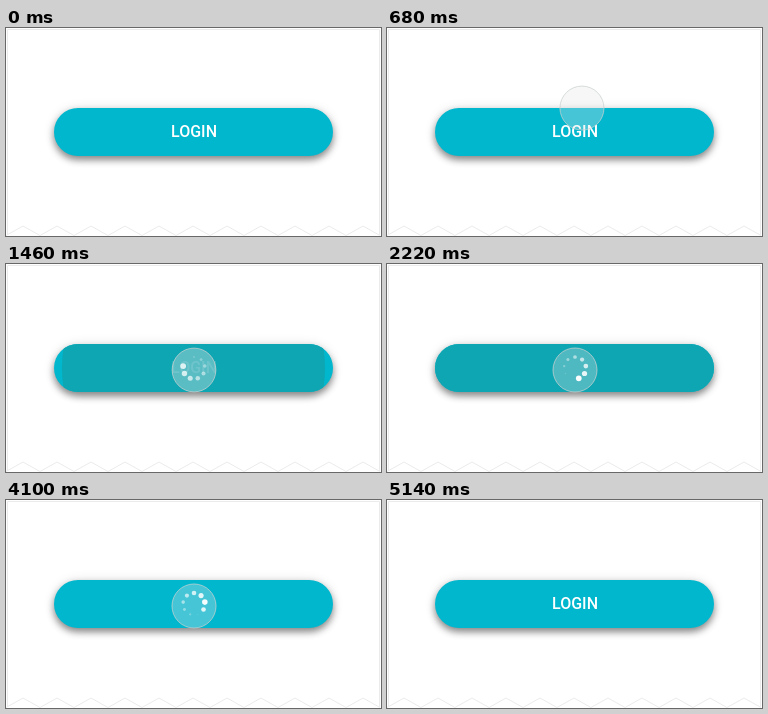
An HTML page that plays this animation: 375 px wide and 208 px high, repeating every 5820 ms.

```html
<!DOCTYPE html>
<html lang="en">
<head>
<meta charset="utf-8">
<title>Login button</title>
<style>
  html, body { margin: 0; width: 100%; height: 100%; overflow: hidden; background: #fff; }
  #button {
    position: absolute; left: 48px; top: 80px; width: 279px; height: 48px;
    border-radius: 24px; background: #00b7ce;
  }
  svg { position: absolute; left: 0; top: 0; }
  text { font: 500 16px Roboto, sans-serif; fill: #fff; text-anchor: middle; }
</style>
</head>
<body>
<div id="button"></div>
<svg width="375" height="208" viewBox="0 0 375 208">
  <clipPath id="pill"><rect x="48" y="80" width="279" height="48" rx="24"/></clipPath>
  <path id="paper" fill="none" stroke="#ebebeb"/>
  <circle id="ripple" cx="187.5" cy="104" fill="#0ea6b2" clip-path="url(#pill)"/>
  <text id="label" x="188" y="109">LOGIN</text>
  <circle id="cursor" stroke="#cbd0d0" stroke-opacity=".75"/>
  <g id="spinner" fill="#fff"></g>
</svg>
<script>
const LOOP = 5820, SPIN = 1045, DOTS = 9;
const $ = id => document.getElementById(id);
const button = $('button'), ripple = $('ripple'), label = $('label');
const cursor = $('cursor'), spinner = $('spinner');

const clamp = v => Math.min(1, Math.max(0, v));
const ramp = (t, from, to) => clamp((t - from) / (to - from));
const mix = (a, b, p) => a + (b - a) * p;
const set = (el, attrs) => {
  for (const name in attrs) el.setAttribute(name, attrs[name]);
};

// Sheet outline with a torn lower edge
let outline = 'M1.5 207V1.5H373.5V207M0 207.5';
for (let i = 1; i <= 22; i++) outline += `L${i * 17} ${i % 2 ? 198 : 207.5}`;
set($('paper'), { d: outline });

const dots = Array.from({ length: DOTS }, (_, i) => {
  const angle = i * 2 * Math.PI / DOTS;
  const dot = document.createElementNS('http://www.w3.org/2000/svg', 'circle');
  set(dot, { cx: 188 + 11 * Math.sin(angle), cy: 104 - 11 * Math.cos(angle) });
  return spinner.appendChild(dot);
});

function drawCursor(t) {
  const left = 1 - ramp(t, 360, 940);
  const out = ramp(t, 4460, 5140);
  const press = ramp(t, 940, 1060) * (1 - ramp(t, 1200, 1500));
  const x = 188 + 108 * left ** 3.4 + 134 * out ** 1.7;
  const y = 106 - 130 * left ** 2 - 130 * out ** 1.91;
  set(cursor, {
    cx: x, cy: y, r: mix(22, 21, press),
    fill: `rgba(228,228,228,${mix(0.3, 0.7, press)})`,
    visibility: t >= 360 && t < 5140 ? 'visible' : 'hidden'
  });
}

function drawSpinner(t) {
  set(spinner, { opacity: ramp(t, 1300, 1500) * (1 - ramp(t, 4460, 4600)) });
  const head = 171 + 360 * (t - 2220) / SPIN;
  dots.forEach((dot, i) => {
    // Degrees since the head passed; a dot starts growing 28 degrees ahead of it
    const age = (((head - i * 40 + 28) % 360) + 360) % 360 - 28;
    const grow = clamp((age + 28) / 12);
    const life = clamp(1 - Math.max(0, age) / 325);
    set(dot, { r: 2.9 * life ** 0.6 * grow ** 0.4, opacity: life ** 0.8 * grow ** 0.3 });
  });
}

function draw(t) {
  const spread = ramp(t, 1200, 1500);
  set(ripple, { r: 145 * spread ** 0.7, opacity: 1 - ramp(t, 2300, 3500) });
  set(label, { opacity: 1 - spread + ramp(t, 4770, 5060) });
  const lift = Math.sin(Math.PI * spread);
  button.style.boxShadow =
    `0 ${4 + lift}px ${7 + lift}px rgba(0,0,0,.42), 0 1px 12px rgba(0,0,0,.13)`;
  drawCursor(t);
  drawSpinner(t);
}

const start = performance.now();
function tick() {
  draw((performance.now() - start) % LOOP);
  requestAnimationFrame(tick);
}
tick();
</script>
</body>
</html>
```
